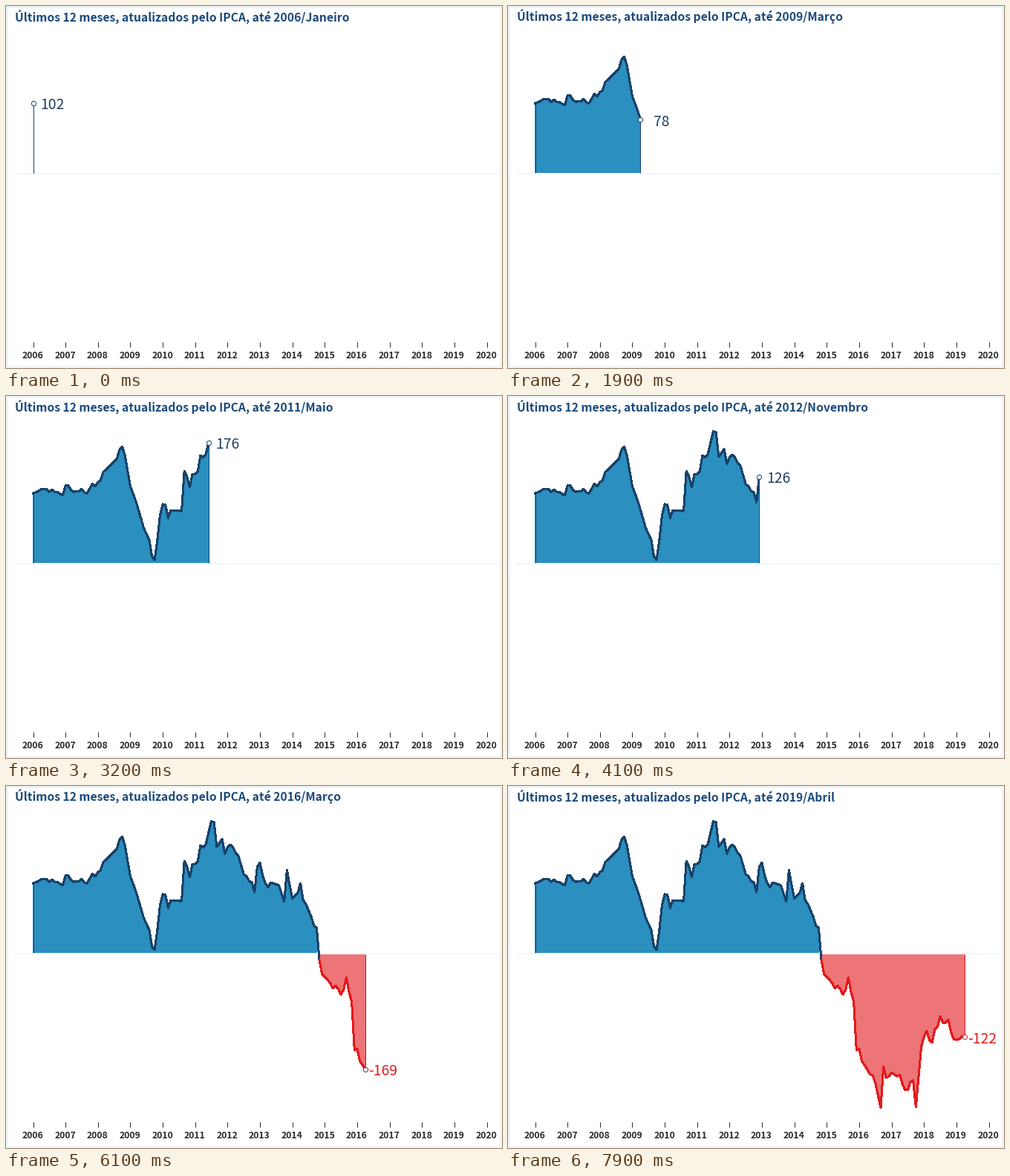
A matplotlib script that plays this animation: 668 px wide and 488 px high, repeating every 8000 ms.

```python
import numpy as np
import matplotlib.pyplot as plt
from matplotlib.animation import FuncAnimation
from matplotlib.patches import Polygon, Rectangle

W, H, DPI = 668, 488, 100
PX = 72 / DPI  # points per pixel
FRAMES, INTERVAL = 80, 100
X0, MONTH_W = 36.5, 611 / 168
ZERO_Y, UNIT = 225.5, 0.926

NAVY, BLUE, RED, PINK = "#17426a", "#2b8fbf", "#e31a1c", "#ed7477"
TITLE, DARK, MAROON, PALE = "#1b4a7b", "#2b2b2b", "#7d2a35", "#eff4f8"
FONT = "Noto Sans CJK JP"
MONTHS = ("Janeiro Fevereiro Março Abril Maio Junho Julho "
          "Agosto Setembro Outubro Novembro Dezembro").split()

_ = np.nan  # month interpolated from its neighbours
BALANCE = {
    2006: [102, _, 105, 108, _, 108, 104, 107, 104, 104, 101, 99],
    2007: [113, 113, 107, 104, _, 105, 108, 103, 102, _, 116, 112],
    2008: [118, 121, 133, _, 140, _, _, 152, 165, 170, 157, _],
    2009: [112, _, 91, 78, _, 51, _, 34, 10, 5, 33, 70],
    2010: [86, 85, 66, 77, _, _, _, 76, 134, 126, 111, 130],
    2011: [130, 134, 157, 154, 159, 176, 192, 191, 155, _, 166, 145],
    2012: [154, 158, 154, 146, 142, _, 115, 112, 105, 103, 89, 126],
    2013: [132, 113, 102, 96, 103, _, _, 99, _, 75, 121, 99],
    2014: [80, _, 88, 102, 77, 72, _, 53, 40, 37, -10, -30],
    2015: [-34, _, -43, -51, -47, -52, -60, -53, -35, -56, -71, -141],
    2016: [-139, -157, _, -169, -176, -178, -189, _, -225, -165, -181, -179],
    2017: [-174, _, -179, -177, -190, -199, -199, -187, -185, -224, _, -136],
    2018: [-122, -113, -126, -130, -111, -107, -92, -101, -101, -97, -114, -125],
    2019: [-126, -125, -121, -122],
}
raw = np.concatenate([np.array(v, float) for v in BALANCE.values()])
known = np.flatnonzero(~np.isnan(raw))
values = np.interp(np.arange(len(raw)), known, raw[known])
LAST = len(values) - 1
FIRST_NEG = int(np.argmax(values < 0))

xs = X0 + MONTH_W * np.arange(len(values))
ys = ZERO_Y - UNIT * values

fig = plt.figure(figsize=(W / DPI, H / DPI), dpi=DPI, facecolor=PALE)
ax = fig.add_axes([0, 0, 1, 1])
ax.set_xlim(0, W)
ax.set_ylim(H, 0)
ax.axis("off")


def text(x, y, s, size, color, weight="bold", ha="center", z=8):
    return ax.text(x, y, s, fontsize=size * PX, color=color, family=FONT,
                   weight=weight, ha=ha, va="baseline", zorder=z)


def line(x, y, color, width, z, **kw):
    return ax.plot(x, y, color=color, lw=width * PX, zorder=z, **kw)[0]


def area(color):
    return ax.add_patch(Polygon([(0, 0)] * 3, closed=True, fc=color, ec="none",
                                antialiased=False, zorder=2))


def fill(patch, lo, hi, base):
    """Shape the patch over months lo to hi, or hide it when too few."""
    patch.set_visible(hi > lo)
    if hi > lo:
        x, y = xs[lo:hi + 1], ys[lo:hi + 1]
        patch.set_xy(np.column_stack([np.r_[x[0], x, x[-1]],
                                      np.r_[base, y, base]]))


ax.add_patch(Rectangle((3, 3), W - 6, H - 6, fc="white", ec="none", zorder=0))
ax.add_patch(Rectangle((12, 225), 650, 2, fc=PALE, ec="none", zorder=3))
for n in range(15):
    x = X0 + 12 * MONTH_W * n
    line([x, x], [453, 460], DARK, 1, 1, solid_capstyle="butt")
    text(x - 0.5, 475, str(2006 + n), 12.3, DARK)

line([X0, X0], [ys[0], 225], NAVY, 1, 4, solid_capstyle="butt")
gain, loss = area(BLUE), area(PINK)
gain_line = line([], [], NAVY, 2, 5, antialiased=False)
loss_line = line([], [], RED, 2, 5, antialiased=False)
stem = line([], [], NAVY, 1, 4, solid_capstyle="butt")
dot = line([], [], NAVY, 1, 7, marker="o", ms=6.2 * PX, mfc="white",
           mew=1 * PX)
title = text(12, 20.5, "", 15.7, TITLE, ha="left")
label = text(0, 0, "", 19.3, NAVY, weight="medium")


def update(frame):
    now = LAST * frame // (FRAMES - 1)
    tip = -(-LAST * frame // (FRAMES - 1))
    x, y, value = xs[tip], ys[tip], values[tip]

    fill(gain, 0, min(tip, FIRST_NEG - 1), 225)
    fill(loss, FIRST_NEG, tip, 227)
    split = min(tip, FIRST_NEG) + 1
    gain_line.set_data(xs[:split], ys[:split])
    loss_line.set_data(xs[FIRST_NEG:tip + 1], ys[FIRST_NEG:tip + 1])

    edge = NAVY if value >= 0 else RED if tip == LAST else MAROON
    stem.set_data([x, x], [225 if value >= 0 else 227, y])
    stem.set_color(edge)
    dot.set_data([x], [y])
    dot.set_markeredgecolor(edge)

    number = f"{value:.0f}"
    label.set_text(number)
    label.set_position((x + 33 - 2.4 * len(number), y + 8.3))
    label.set_color("#1f3f63" if value >= 0 else RED)
    title.set_text("Últimos 12 meses, atualizados pelo IPCA, até "
                   f"{2006 + now // 12}/{MONTHS[now % 12]}")
    return gain, loss, gain_line, loss_line, stem, dot, label, title


anim = FuncAnimation(fig, update, frames=FRAMES, interval=INTERVAL,
                     repeat=True, repeat_delay=0, blit=False)
plt.show()
```
